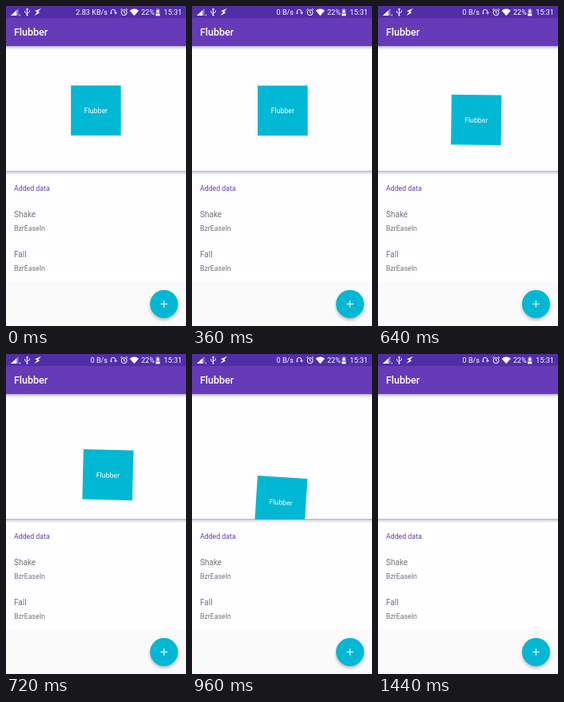
An HTML page that plays this animation: 225x400 px, repeating every 2.04 s.

```html
<!DOCTYPE html>
<html lang="en">
<head>
<meta charset="utf-8">
<title>Falling box</title>
<style>
  html, body { margin: 0; width: 100%; height: 100%; overflow: hidden; background: #fafafa; }
  svg { display: block; width: 100vw; height: 100vh; font-family: Roboto, sans-serif; }
  .status { font-size: 9.1px; fill: #fff; }
  .label { font-size: 8.75px; }
  .item { font-size: 10px; }
  .list { fill: #757575; }
  .line { fill: none; stroke: #fff; stroke-width: 1; }
</style>
</head>
<body>
<svg viewBox="0 0 225 400">
  <defs>
    <linearGradient id="shade" x2="0" y2="1">
      <stop offset="0" stop-opacity=".3"/>
      <stop offset=".4" stop-opacity=".12"/>
      <stop offset="1" stop-opacity="0"/>
    </linearGradient>
    <filter id="blur" x="-50%" y="-50%" width="200%" height="200%">
      <feGaussianBlur stdDeviation="2"/>
    </filter>
    <clipPath id="panel"><rect y="50" width="225" height="156.5"/></clipPath>
  </defs>

  <rect width="225" height="400" fill="#fafafa"/>
  <rect y="50" width="225" height="294" fill="#fefdff"/>

  <g clip-path="url(#panel)">
    <g id="box">
      <rect x="-31.25" y="-31.25" width="62.5" height="62.5" fill="#00b8d4"/>
      <text class="label" y="3.4" text-anchor="middle" fill="#fff">Flubber</text>
    </g>
  </g>
  <rect y="50" width="225" height="5" fill="url(#shade)"/>
  <rect y="206" width="225" height="5.5" fill="url(#shade)"/>

  <rect width="225" height="50" fill="#673ab7"/>
  <rect width="225" height="15" fill="#512da8"/>
  <text x="10" y="37.3" font-size="12.5" font-weight="500" fill="#fff">Flubber</text>

  <!-- status bar -->
  <path d="M6 12L15.5 3V12Z" fill="#fff" opacity=".4"/>
  <path d="M6 12L13 5.4V12Z" fill="#fff"/>
  <path class="line" d="M17.3 10.5v2"/>
  <g class="line">
    <path d="M26.5 3.5V12M23.7 6v2.2l2.8 1.8M29.3 5.5v2l-2.8 1.5"/>
    <path d="M25.3 4.5l1.2-1.5 1.2 1.5" fill="#fff"/>
    <circle cx="26.5" cy="11.6" r=".7"/>
  </g>
  <path d="M44 3L36 6.2L39 7.6L35.5 12L42 8.6L40.3 6.8Z" fill="#fff"/>
  <text id="speed" class="status" x="127" y="11.3" text-anchor="end"></text>
  <path class="line" d="M131.3 10V7a2.6 2.6 0 0 1 5.2 0M130.5 9.3h2M135.5 8.5h3M137 6.5v4" stroke-width="1.2"/>
  <g class="line">
    <circle cx="147.6" cy="8.2" r="3.5"/>
    <path d="M147.6 6v2.4l1.6 1M143.3 5l2-1.8M149.9 3.2l2 1.8"/>
  </g>
  <path d="M154.6 5.7Q160.3 1.4 166 5.7L160.3 12.3Z" fill="#fff"/>
  <text class="status" x="169" y="11.3">22%</text>
  <path d="M187.3 4.2h1.3v-1h2.4v1h1.3v8h-5Z" fill="#fff" opacity=".45"/>
  <path d="M187.3 9.8h5v2.4h-5ZM188.6 5.2h2.4v3h-2.4Z" fill="#fff"/>
  <text class="status" x="197.3" y="11.3">15:31</text>

  <text class="label" x="10" y="230.8" fill="#673ab7">Added data</text>
  <g class="list">
    <text class="item" x="10" y="264">Shake</text>
    <text class="label" x="10" y="281">BzrEaseIn</text>
    <text class="item" x="10" y="314">Fall</text>
    <text class="label" x="10" y="331.3">BzrEaseIn</text>
  </g>

  <circle cx="197.5" cy="375" r="17" opacity=".32" filter="url(#blur)"/>
  <circle cx="197.5" cy="372.5" r="17.5" fill="#00b8d4"/>
  <path class="line" d="M193.2 372.5h8.6M197.5 368.2v8.6" stroke-width="1.3"/>
</svg>
<script>
  const LOOP = 2040, STEP = 40, START = 240;
  const box = document.getElementById('box');
  const speed = document.getElementById('speed');

  // [time, drop] pairs joined by a smooth curve
  const drops = [[240, 0], [360, 0.2], [520, 2.2], [720, 20.5], [960, 54.5], [1080, 83.5], [1240, 120]];

  function slope(i) {
    const a = drops[Math.max(i - 1, 0)];
    const b = drops[Math.min(i + 1, drops.length - 1)];
    return (b[1] - a[1]) / (b[0] - a[0]);
  }

  function drop(t) {
    if (t <= START) return 0;
    const i = drops.findIndex(p => p[0] >= t) - 1;
    if (i < 0) return 120;
    const [t0, y0] = drops[i], [t1, y1] = drops[i + 1];
    const span = t1 - t0, u = (t - t0) / span, v = 1 - u;
    return v * v * ((1 + 2 * u) * y0 + u * span * slope(i))
         + u * u * ((3 - 2 * u) * y1 - v * span * slope(i + 1));
  }

  function shake(t) {
    const eased = (Math.max(t - START, 0) / 1000) ** 2;
    const turn = 0.262;
    return eased < turn ? 65 * eased : 17 - 71 * (eased - turn);
  }

  function draw(now) {
    const t = Math.floor((now % LOOP) / STEP) * STEP;
    const y = drop(t);
    box.setAttribute('transform', `translate(${112.4 + shake(t)} ${130.6 + y}) rotate(${y / 15})`);
    box.setAttribute('visibility', t < 1240 ? 'visible' : 'hidden');
    speed.textContent = t < 80 ? '2.83 KB/s' : '0 B/s';
  }

  const begin = performance.now();
  function tick() {
    draw(performance.now() - begin);
    requestAnimationFrame(tick);
  }
  tick();
</script>
</body>
</html>
```
